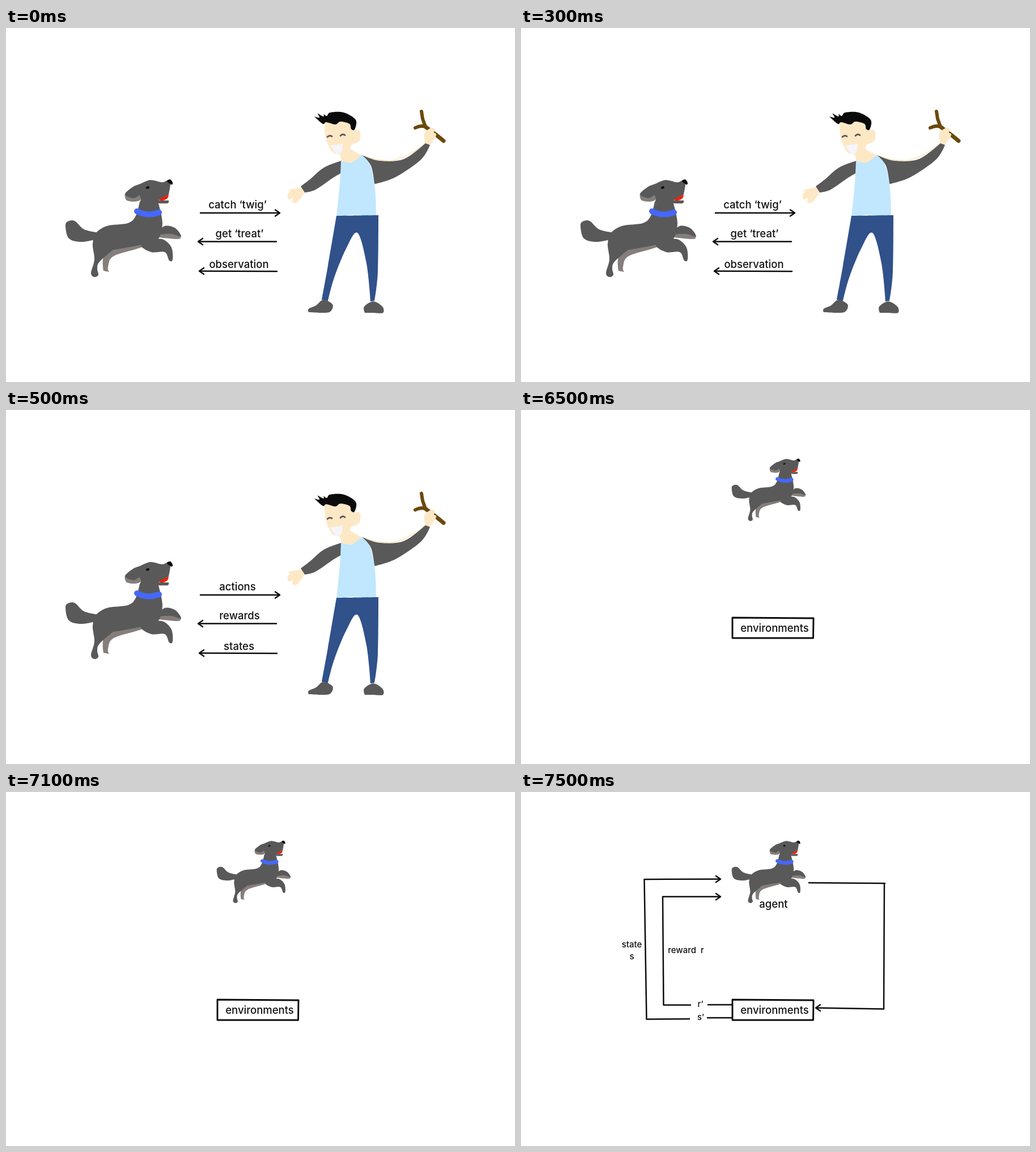
Recreate the animation shown at these times as an HTML page. Size 898 by 624 pixels, loop 8 s.

```html
<!DOCTYPE html>
<html lang="en">
<head>
<meta charset="utf-8">
<title>Agent and environment</title>
<style>
  html, body { margin: 0; width: 100%; height: 100%; overflow: hidden; background: #fff; }
  svg { display: block; width: 100%; height: 100%; }
  text { font: 500 18.5px Inter, sans-serif; fill: #111; text-anchor: middle; white-space: pre; }
  .small { font-size: 15px; }
  .line { fill: none; stroke: #0c0c0c; stroke-width: 2.5; stroke-linecap: round; stroke-linejoin: round; }
</style>
</head>
<body>
<svg viewBox="0 0 898 624">
  <defs><path id="tip" class="line" d="M-8 -5.500L0 0L-8 5.500"/></defs>
  <g id="dog"></g>
  <g id="play">
    <g id="man"></g>
    <path class="line" d="M343 326H482M477 376.500H340M478 429L342 428.500"/>
    <use href="#tip" x="483" y="326"/>
    <use href="#tip" transform="translate(339 376.500) scale(-1 1)"/>
    <use href="#tip" transform="translate(341 428.500) scale(-1 1)"/>
    <text id="top" x="408.500" y="318"></text>
    <text id="mid" x="412" y="369"></text>
    <text id="low" x="411" y="423"></text>
  </g>
  <g id="model">
    <path class="line" style="stroke-width:2.9" d="M373 366L516 367L515.500 402H373Z"/>
    <text x="447.500" y="391">environments</text>
    <g id="loop">
      <path class="line" d="M372 398H329M297 400L221.500 400.500L217.500 154L351 153.500M372 375H330M299 375.500H251.500L250 184.500H350M508 160L642 161M641 161L640 382.500L521 380.500"/>
      <use href="#tip" x="352" y="153.500"/>
      <use href="#tip" x="352" y="184.500"/>
      <use href="#tip" transform="translate(520 380.500) scale(-1 1)"/>
      <text x="445.500" y="204">agent</text>
      <text class="small" x="195.500" y="273.500">state</text>
      <text class="small" x="195.500" y="295">s</text>
      <text class="small" x="291" y="283.500">reward  r</text>
      <text class="small" x="316.500" y="379">r’</text>
      <text class="small" x="317" y="401.500">s’</text>
    </g>
  </g>
</svg>
<script>
const $ = id => document.getElementById(id);
const LOOP = 8000;
const GREY = '#595959', SHADE = '#857e7b', SKIN = '#fde8c6', BROWN = '#6b490c';
const EXAMPLE = ['catch ‘twig’', 'get ‘treat’', 'observation'];
const TERMS = ['actions', 'rewards', 'states'];

// Smooth closed outline through the points; a point marked "!" is a corner.
function outline(text) {
  const p = text.split(' ').map(s => {
    const point = s.replace('!', '').split(',').map(Number);
    return { point, sharp: s.endsWith('!') };
  });
  const n = p.length;
  const at = i => p[(i + n) % n].point;
  const slope = (i, k) => p[i % n].sharp ? 0 : (at(i + 1)[k] - at(i - 1)[k]) / 6;
  let d = 'M' + at(0);
  for (let i = 0; i < n; i++) {
    const c1 = at(i).map((v, k) => v + slope(i, k));
    const c2 = at(i + 1).map((v, k) => v - slope(i + 1, k));
    d += `C${c1} ${c2} ${at(i + 1)}`;
  }
  return d + 'Z';
}

function add(group, attrs) {
  const el = document.createElementNS('http://www.w3.org/2000/svg', 'path');
  for (const key in attrs) el.setAttribute(key, attrs[key]);
  $(group).append(el);
}

const shape = (group, fill, points) => add(group, { fill, d: outline(points) });
const stroke = (group, color, width, d) => add(group, {
  d, stroke: color, 'stroke-width': width, fill: 'none', 'stroke-linecap': 'round', 'stroke-linejoin': 'round'
});

function drawDog() {
  const s = (fill, points) => shape('dog', fill, points);
  // shaded far side
  s(SHADE, '172,404 190,385 240,376 240,386 190,402 180,421 182,430! 172,428!');
  s(SHADE, '268,362 290,361 308,369 300,372 270,369!');
  s(SHADE, '212,290 236,294 237,303 226,306 212,303');
  // tail, torso, legs
  s(GREY, '105,349 109,341 121,340 138,355 165,361! 160,372! 134,377 111,371');
  s(GREY, '157,363 178,349 215,344 229,331 236,306! 268,306! 276,344 267,374 240,382 189,391 165,394 154,379');
  s(GREY, '155,376 190,390! 165,412 161,424 163,435 156,439 150,432 156,408');
  s(GREY, '267,362 280,349 299,353 309,368 292,363 268,364');
  s(GREY, '260,372! 278,373 292,387 294,408 288,410 280,395 256,395 238,383');
  // head
  s(GREY, '236,275 255,268 276,272 290,268 287,293! 269,304! 287,304! 285,309 268,309! 236,307! 238,301 235,294! 225,300 210,293 224,280');
  s('#f0200a', '268,303! 278,298 287,293! 285,300 277,304');
  s('#090909', '284,270 290,267 294,273 292,276');
  stroke('dog', '#090909', 4, 'M249 281.500L251 281');
  stroke('dog', '#4668fb', 10, 'M231 323Q250 333 270 325');
}

function drawMan() {
  const s = (fill, points) => shape('man', fill, points);
  // head
  s(SKIN, '562,164! 592,158 610,167 613,181! 624,181 624,198 611,205! 608,213 629,225! 610,239 591,234! 589,224 575,218 564,193');
  s('#0b0b0b', '544,156! 553,158 549,150! 560,156 560,151! 566,155 572,149 596,149 617,162 615,179 609,178 606,169 590,165 581,170 565,166 559,169');
  stroke('man', '#5b5655', 2.7, 'M567 192Q571 188.500 575 191M590 190Q594 185.500 598 189');
  s('#f5f5fa', '572,207! 594,204! 592,218 583,222');
  // arms
  s(SKIN, '522,281! 500,285 501,289 497,293 498,302 506,300 505,307 514,307 526,291!');
  s(GREY, '592,234! 561,246 536,267 520,279! 527,290! 546,285 577,264 591,256!');
  stroke('man', SKIN, 2, 'M630 225Q650 234 681 234Q710 227 741 203');
  s(GREY, '628,224! 659,234 702,231 740,203! 748,206! 732,232 687,263 650,275! 644,243');
  // shirt and trousers
  s('#c0e7fe', '591,234! 610,237 627,224! 642,241 651,283 653,330! 634,332 613,329 583,333! 589,273');
  s('#30518a', '583,331! 657,330! 656,430 650,481! 643,482! 636,415 620,361 600,389 579,440 568,481! 557,479! 568,419');
  // shoes
  s(GREY, '534,495 547,489 560,479 576,487 574,498 564,502 534,501!');
  s(GREY, '633,502! 632,491 648,482 664,491 665,502 648,502');
  // stick, with the hand over it
  stroke('man', BROWN, 6, 'M733 147L735 160L740 174Q731 171 722 176');
  stroke('man', BROWN, 7, 'M740 174L761 190L772 199');
  s(SKIN, '740,203! 738,186 750,176 757,179 755,184 759,187 757,193 748,206!');
}

function render(t) {
  const show = (id, on) => { $(id).style.display = on ? '' : 'none'; };
  const play = t < 6500;
  const words = t < 500 ? EXAMPLE : TERMS;
  ['top', 'mid', 'low'].forEach((id, i) => { $(id).textContent = words[i]; });
  show('play', play);
  show('model', !play);
  show('loop', t >= 7500);
  $('dog').setAttribute('transform', play ? '' : 'translate(371.400 86) scale(.64) translate(-104.500 -267.500)');
}

drawDog();
drawMan();
const start = performance.now();
function tick() {
  render((performance.now() - start) % LOOP);
  requestAnimationFrame(tick);
}
tick();
</script>
</body>
</html>
```
